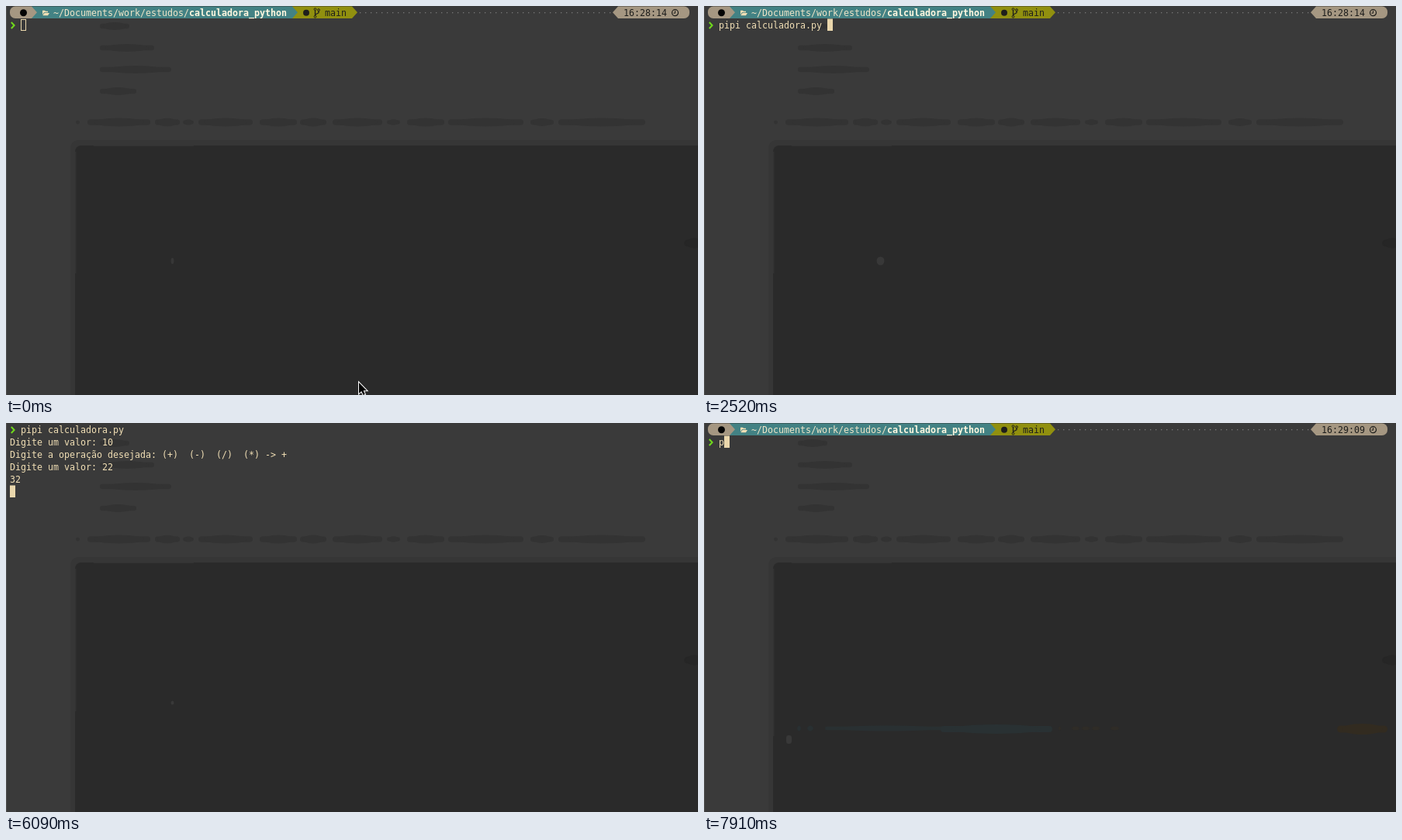
An HTML page with a canvas for the animation above (8 s loop, 892 px wide and 502 px high).

```html
<!DOCTYPE html>
<html lang="pt-BR">
<head>
<meta charset="utf-8">
<title>Terminal</title>
<style>
  html, body { margin: 0; width: 100%; height: 100%; overflow: hidden; background: #3a3a3a; }
  canvas { display: block; }
</style>
</head>
<body>
<canvas id="stage" width="892" height="502"></canvas>
<script>
const ctx = document.getElementById('stage').getContext('2d');
const LOOP = 8000, CELL = 7, LINE = 16, LEFT = 5;
const FONT = '11.627px "DejaVu Sans Mono", monospace';
const INK = '#f1dfb5', CURSOR = '#ead7ac', DARK = '#1e1e1c';
const SAND = '#a59782', TEAL = '#438284', OLIVE = '#91900f', AMBER = '#d0921f';

const colX = col => LEFT + col * CELL;

// ---- primitives ----
function rect(x, y, w, h, color) {
  ctx.fillStyle = color;
  ctx.fillRect(x, y, w, h);
}

function round(x, y, w, h, radii, color) {
  ctx.fillStyle = color;
  ctx.beginPath();
  ctx.roundRect(x, y, w, h, radii);
  ctx.fill();
}

function poly(points, color) {
  ctx.fillStyle = color;
  ctx.beginPath();
  points.forEach(([x, y]) => ctx.lineTo(x, y));
  ctx.closePath();
  ctx.fill();
}

function line(points, color, width) {
  ctx.strokeStyle = color;
  ctx.lineWidth = width;
  ctx.beginPath();
  points.forEach(([x, y], i) => i ? ctx.lineTo(x, y) : ctx.moveTo(x, y));
  ctx.stroke();
}

function ring(x, y, r, color, width = 1) {
  ctx.strokeStyle = color;
  ctx.lineWidth = width;
  ctx.beginPath();
  ctx.arc(x, y, r, 0, Math.PI * 2);
  ctx.stroke();
}

function oval(x, y, rx, ry, color) {
  ctx.fillStyle = color;
  ctx.beginPath();
  ctx.ellipse(x, y, rx, ry, 0, 0, Math.PI * 2);
  ctx.fill();
}

// Terminal text: one character per grid cell.
function text(str, col, row, color = INK, weight = '') {
  ctx.font = `${weight} ${FONT}`;
  ctx.fillStyle = color;
  [...str].forEach((ch, i) => ctx.fillText(ch, colX(col + i), row * LINE + 13));
}

// ---- blurred window behind the terminal ----
function smudge(x1, x2, y, color = '#333333', h = 10) {
  const w = x2 - x1, mid = (x1 + x2) / 2;
  round(x1, y - h * 0.33, w, h * 0.66, h * 0.33, color);
  oval(mid, y, w * 0.4, h / 2, color);
}

function backdrop(t) {
  rect(0, 0, 892, 502, '#3a3a3a');
  rect(0, 0, 1, 502, '#505050');
  round(83, 173, 820, 340, [10, 0, 0, 0], '#363636');
  round(89, 180, 810, 330, [8, 0, 0, 0], '#2a2a2a');
  const edge = t < 4130 ? 345 : t < 7350 ? 372 : 404;
  rect(89, 188, 1.5, edge - 188, '#323232');
  rect(113, 180, 129, 1, '#323232');

  [[159, 26], [191, 54], [213, 82], [168, 110]].forEach(([end, y]) => smudge(121, end, y));
  [[90, 95], [105, 186], [192, 224], [228, 242], [248, 318], [327, 375], [379, 413],
   [421, 485], [491, 508], [517, 565], [570, 667], [676, 706], [712, 824]]
    .forEach(([a, b]) => smudge(a, b, 150, '#333333', Math.min(11, 4 + (b - a) / 5)));
  smudge(874, 900, 306, '#262626', 13);

  if (t < 840 + 140) oval(214.5, 329, 2, 4, '#373737');
  else if (t < 4130) oval(227.5, 329, 5, 5.5, '#383838');
  else if (t < 6720) oval(214.5, 361, 2, 2.5, '#393939');
  else if (t < 7350) oval(220.5, 361, 4, 5.5, '#373737');
  else {
    [[120, 125], [133, 141], [156, 316]].forEach(([a, b]) => smudge(a, b, 394, '#293032', 7));
    smudge(305, 449, 395, '#293133', 12);
    [[457, 460], [474, 484], [487, 497], [500, 510], [524, 535]]
      .forEach(([a, b]) => smudge(a, b, 394, '#2f2c27', 5));
    smudge(816, 881, 395, '#322b20', 14);
    round(106, 403, 7, 11, 3, '#383838');
  }
}

// ---- prompt ----
function chevron(row) {
  const y = row * LINE + 9;
  line([[6.8, y - 4], [10.6, y], [6.8, y + 4]], '#70d91c', 2);
}

function arrow(col, row, dir, color) {
  const x = colX(col), y = row * LINE + 0.5;
  const base = dir > 0 ? x : x + CELL, tip = dir > 0 ? x + CELL : x;
  poly([[base, y], [tip, y + 7.75], [base, y + 15.5]], color);
}

function bar(col, end, row, color) {
  rect(colX(col), row * LINE + 0.5, (end - col) * CELL, 15.5, color);
}

function folderIcon(y) {
  poly([[47, y - 3], [50, y - 3], [51, y - 2], [54, y - 2], [54, y - 0.5], [49, y - 0.5], [47, y + 2.5]], INK);
  poly([[49.5, y + 0.3], [56, y + 0.3], [54, y + 3.5], [47.3, y + 3.5]], INK);
}

function branchIcon(y) {
  line([[398.5, y - 3], [398.5, y + 4]], DARK, 1.3);
  line([[403, y - 2], [403, y], [398.5, y + 2.5]], DARK, 1.3);
  [[398.5, y - 4.5], [403, y - 3.5], [398.5, y + 5]].forEach(([x, cy]) => ring(x, cy, 1.4, DARK));
}

function clockIcon(y) {
  ring(862.5, y, 4, DARK, 1.2);
  line([[862.5, y - 2.5], [862.5, y + 0.5], [860.5, y + 0.5]], DARK, 1);
}

function hourglassIcon(y) {
  line([[768, y - 4.5], [776, y - 4.5]], DARK, 1.4);
  line([[768, y + 4.5], [776, y + 4.5]], DARK, 1.4);
  line([[769.5, y - 4], [769.5, y - 2.5], [774.5, y + 2.5], [774.5, y + 4]], DARK, 1.1);
  line([[774.5, y - 4], [774.5, y - 2.5], [769.5, y + 2.5], [769.5, y + 4]], DARK, 1.1);
  poly([[770, y + 4], [772, y + 1], [774, y + 4]], DARK);
}

function prompt(row, time, duration) {
  const top = row * LINE + 0.5, mid = row * LINE + 8.7;

  bar(52, 63, row, OLIVE);
  arrow(63, row, 1, OLIVE);
  bar(4, 52, row, TEAL);
  arrow(52, row, 1, TEAL);
  round(LEFT, top, 28, 15.5, [7, 0, 0, 7], SAND);
  arrow(4, row, 1, SAND);

  oval(22.5, mid, 4.5, 4.5, '#050505');
  folderIcon(mid);
  text('~/Documents/work/estudos/', 8, row, '#efe5c8');
  text('calculadora_python', 33, row, '#fff8e0', 'bold');
  oval(387, mid, 4, 4, DARK);
  branchIcon(mid);
  text('main', 58, row, DARK);

  const dotsEnd = duration ? 104 : 111;
  for (let col = 64; col < dotsEnd; col++) rect(colX(col) + 3, mid - 0.7, 1.3, 1.3, '#777777');

  if (duration) {
    arrow(104, row, -1, AMBER);
    bar(105, 112, row, AMBER);
    text(duration, 106, row, DARK);
    hourglassIcon(mid);
  }
  arrow(111, row, -1, SAND);
  round(colX(112), top, 92, 15.5, [0, 7, 7, 0], SAND);
  text(time, 113, row, DARK);
  clockIcon(mid);
  chevron(row + 1);
}

function cursor(col, row, hollow) {
  const x = colX(col), y = row * LINE + 0.5;
  if (hollow) {
    ctx.strokeStyle = CURSOR;
    ctx.lineWidth = 1;
    ctx.strokeRect(x + 0.5, y + 1, CELL - 1, 14);
  } else rect(x, y, CELL, 15.5, CURSOR);
}

function pointer(x, y) {
  const shape = [[0, 0], [0, 14], [3.2, 11], [5.5, 16], [7.8, 15], [5.6, 10.2], [10, 10.2]]
    .map(([dx, dy]) => [x + dx, y + dy]);
  line([...shape, shape[0], shape[1]], '#ffffff', 2);
  poly(shape, '#000000');
}

// ---- session ----
const RUN_KEYS = [[840, 'p'], [980, 'i'], [1190, 'p'], [1260, 'i'], [1820, ' '],
                  [2100, 'c'], [2170, 'a'], [2310, 'l'], [2450, 'culadora.py ']];
const CLEAR_KEYS = [[6720, 'c'], [6860, 'l'], [6930, 'e'], [7140, 'a'], [7210, 'r']];
const ANSWERS = [
  { at: 2800, label: 'Digite um valor: ', keys: [[3500, '1'], [3640, '0']] },
  { at: 4130, label: 'Digite a operação desejada: (+)  (-)  (/)  (*) -> ', keys: [[4690, '+']] },
  { at: 5110, label: 'Digite um valor: ', keys: [[5670, '2'], [5880, '2']] },
  { at: 6090, label: '32', keys: [] },
];

const typed = (keys, t) => keys.filter(([at]) => at <= t).map(([, s]) => s).join('');

function typeCommand(keys, t, row, hollow) {
  const command = typed(keys, t);
  text(command, 2, row);
  cursor(2 + command.length, row, hollow);
}

function program(t) {
  chevron(0);
  text('pipi calculadora.py', 2, 0);
  const shown = ANSWERS.filter(a => a.at <= t).map(a => a.label + typed(a.keys, t));
  shown.forEach((str, i) => text(str, 0, i + 1));
  if (t < 6090) cursor(shown.at(-1).length, shown.length);
  else if (t < 6160) cursor(0, 5);
  else {
    prompt(5, '16:29:08', '3s');
    typeCommand(CLEAR_KEYS, t, 6);
  }
}

function draw(t) {
  backdrop(t);
  if (t < 2800) {
    prompt(0, '16:28:14');
    typeCommand(RUN_KEYS, t, 1, t < 140);
  } else if (t < 7350) {
    program(t);
  } else if (t < 7420) {
    cursor(0, 0);
  } else {
    prompt(0, '16:29:09');
    typeCommand([[7910, 'p']], t, 1);
  }
  if (t < 140) pointer(455, 486 + (t < 70 ? 0 : 8));
}

const start = performance.now();
function tick() {
  draw((performance.now() - start) % LOOP);
  requestAnimationFrame(tick);
}
tick();
</script>
</body>
</html>
```
